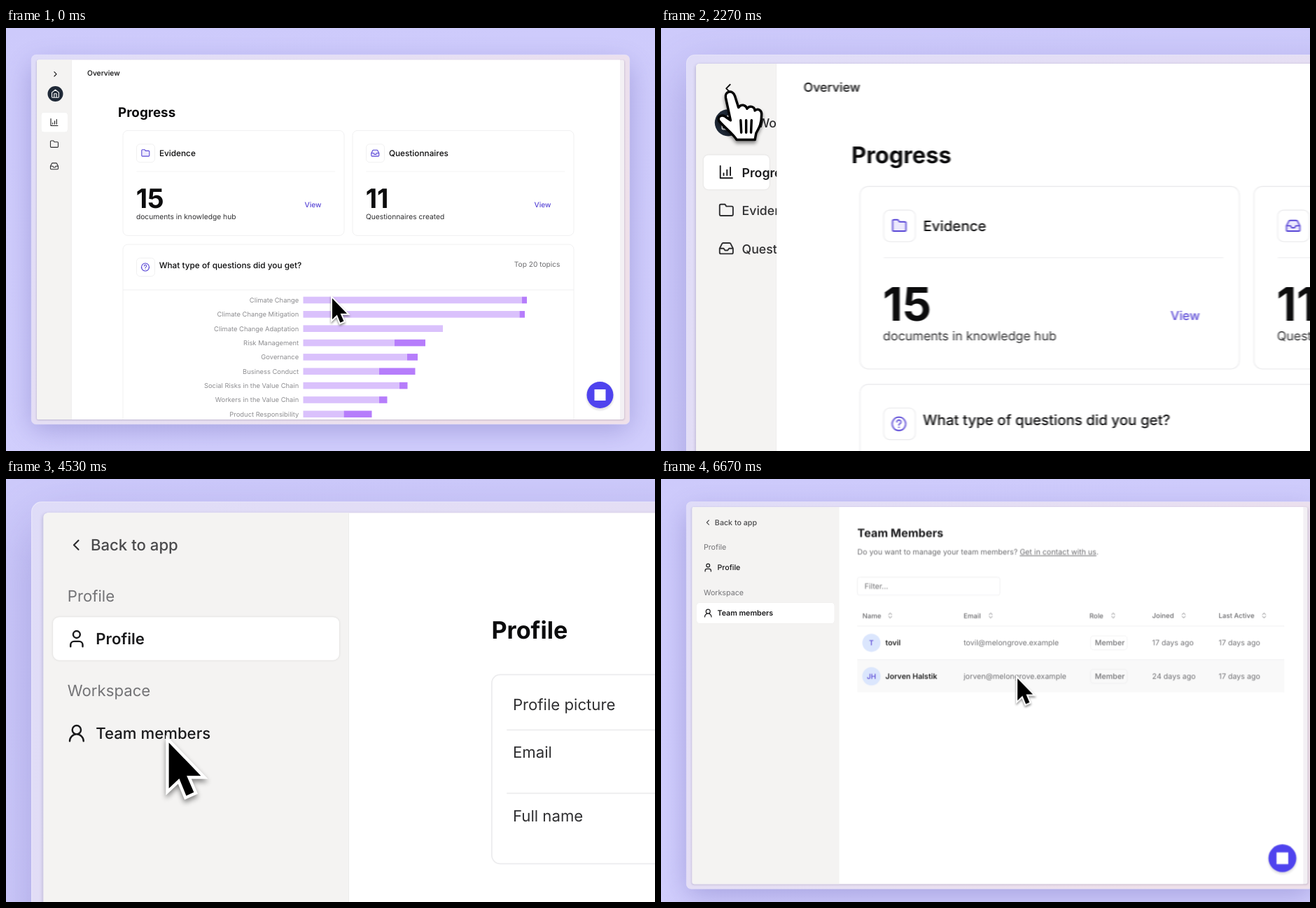
An HTML page that plays this animation: 927 px wide and 604 px high, repeating every 6740 ms.

```html
<!DOCTYPE html>
<html lang="en">
<head>
<meta charset="utf-8">
<title>Workspace tour</title>
<style>
  html, body { margin: 0; width: 100%; height: 100%; overflow: hidden; background: #cfccfc; }
  svg { display: block; width: 927px; height: 604px; font-family: Inter, "Liberation Sans", sans-serif; }
  text { text-rendering: geometricPrecision; white-space: pre; }
  .lift { filter: drop-shadow(0 .7px .7px rgba(0, 0, 0, .13)); }
  .menu { filter: drop-shadow(0 4px 6px rgba(0, 0, 0, .13)) drop-shadow(0 0 .6px rgba(0, 0, 0, .25)); }
  .pointer { filter: drop-shadow(.5px 2px 1.6px rgba(0, 0, 0, .45)); }
</style>
</head>
<body>
<svg viewBox="0 0 927 604">
  <defs>
    <linearGradient id="backdrop" x2=".3" y2="1">
      <stop stop-color="#cdcafb"/><stop offset="1" stop-color="#d1cefd"/>
    </linearGradient>
    <linearGradient id="bezel" x2="1" y2=".5">
      <stop stop-color="#dfdcf8"/><stop offset=".6" stop-color="#e7dff2"/><stop offset="1" stop-color="#efe0e9"/>
    </linearGradient>
    <filter id="soft" x="-20%" y="-20%" width="140%" height="150%"><feGaussianBlur stdDeviation="19"/></filter>
    <filter id="edge" x="-5%" y="-5%" width="110%" height="110%"><feGaussianBlur stdDeviation="1.3"/></filter>
    <filter id="smear" filterUnits="userSpaceOnUse" x="36" y="38" width="860" height="530" color-interpolation-filters="sRGB">
      <feGaussianBlur id="smearBlur" stdDeviation="0 0"/>
    </filter>
    <filter id="trail" filterUnits="userSpaceOnUse" x="-40" y="-30" width="110" height="120" color-interpolation-filters="sRGB">
      <feGaussianBlur id="trailBlur" stdDeviation="0 0"/>
    </filter>
    <clipPath id="screenClip"><rect x="44" y="45.5" width="839" height="513.5" rx="3"/></clipPath>
    <clipPath id="sideClip"><rect id="sideClipBox" x="44" y="45" height="515"/></clipPath>
  </defs>
  <rect width="927" height="604" fill="url(#backdrop)"/>
  <g id="camera">
    <rect x="36" y="52" width="855" height="522" rx="10" fill="#4a42a0" opacity=".32" filter="url(#soft)"/>
    <rect x="36.3" y="38.3" width="854.4" height="527.4" rx="6.5" fill="url(#bezel)" stroke="#eae7fa" stroke-width=".5"/>
    <rect x="43.5" y="46" width="840" height="514" rx="3" fill="#58507a" opacity=".28" filter="url(#edge)"/>
    <g clip-path="url(#screenClip)">
      <rect x="44" y="45" width="839" height="515" fill="#f3f0f4"/>
      <rect x="44" y="45" width="833" height="515" fill="#fff"/>
      <g id="main"></g>
      <g id="side" clip-path="url(#sideClip)"></g>
      <g id="overlay"></g>
    </g>
    <g id="cursor">
      <g class="pointer" id="arrow">
        <path d="M2 4V34L8.8 27.6 13.4 38.8 18.4 36.6 13.7 25.8H23Z" fill="#000" stroke="#fff" stroke-width="4" paint-order="stroke"/>
      </g>
      <g class="pointer" id="hand" stroke="#000" stroke-width="2" stroke-linecap="round" stroke-linejoin="round">
        <path d="M-3.500 5.500C-4.500 0 2 -1.500 4 4L7 13.500C9 10.500 13 11 14 14.500 16 11.500 20 12.500 20.500 16 23 14 26 15.500 26 19 26 27 24 30 21.500 34.500L20.500 40H5.500C2 34.500-4.500 30-9 24.500-11 20.500-6 18.500-2.500 22L.500 24Z" fill="#fff"/>
        <path d="M8.800 24 9.300 34M13.300 24V34M17.700 24 17.300 34"/>
      </g>
    </g>
  </g>
</svg>
<script>
const LOOP = 6740, ZOOM = 1.177, RATE = 6.1, FOCUS_Y = 120;
const ACCENT = '#5a48d6', INK = '#0c0c0d', TEXT = '#2f2f31', MUTED = '#737376', LINE = '#ececee';
const $ = id => document.getElementById(id);
const clamp = (v, a = 0, b = 1) => Math.min(b, Math.max(a, v));
const smooth = u => u * u * (3 - 2 * u);
const within = (t, a, b) => t >= a && t < b;

// Critically damped step response that begins at the given time.
const spring = (t, start) => {
  const x = Math.max(0, t - start) / 1000 * RATE;
  return 1 - (1 + x) * Math.exp(-x);
};

const gear = Array.from({ length: 32 }, (_, i) => {
  const r = i % 4 < 2 ? 10.6 : 8, a = (i + .5) * Math.PI / 16;
  return (12 + r * Math.cos(a)).toFixed(1) + ' ' + (12 + r * Math.sin(a)).toFixed(1);
}).join('L');
const ICONS = {
  right: 'M9 6l6 6-6 6',
  left: 'M15 6l-6 6 6 6',
  down: 'M5 9l7 7 7-7',
  sort: 'M7 9l5-5 5 5M7 15l5 5 5-5',
  home: 'M3 9l9-7 9 7v11a2 2 0 0 1-2 2H5a2 2 0 0 1-2-2zM9 22V12h6v10',
  bars: 'M3 3v18h18M8 17v-3M13 17V9M18 17V5',
  folder: 'M4 20h16a2 2 0 0 0 2-2V8a2 2 0 0 0-2-2h-8l-2-3H4a2 2 0 0 0-2 2v13a2 2 0 0 0 2 2z',
  inbox: 'M22 12h-6l-2 3h-4l-2-3H2M5.500 5.100 2 12v6a2 2 0 0 0 2 2h16a2 2 0 0 0 2-2v-6l-3.500-6.900A2 2 0 0 0 16.800 4H7.200a2 2 0 0 0-1.700 1.100z',
  user: 'M12 11a4 4 0 1 0 0-8 4 4 0 0 0 0 8M19 21v-2a4 4 0 0 0-4-4H9a4 4 0 0 0-4 4v2',
  member: 'M12 13a5 5 0 1 0 0-10 5 5 0 0 0 0 10M20 21a8 8 0 0 0-16 0',
  help: 'M12 2a10 10 0 1 0 .010 0M9 9.200a3 3 0 1 1 4.500 2.600Q12 12.700 12 14M12 17v.200',
  gear: `M${gear}ZM12 8.500a3.500 3.500 0 1 0 .010 0`,
  exit: 'M9 3H3v18h6M17 17l5-5-5-5M21 12H9'
};

const text = (str, x, cy, { size = 10.2, weight = 400, fill = TEXT, anchor = 'start' } = {}) =>
  `<text x="${x}" y="${cy + size * .36}" font-size="${size}" font-weight="${weight}" fill="${fill}" text-anchor="${anchor}">${str}</text>`;
const icon = (name, cx, cy, size = 13.2, color = TEXT, fill = 'none') =>
  `<path transform="translate(${cx - size / 2} ${cy - size / 2}) scale(${size / 24})" d="${ICONS[name]}" fill="${fill}" stroke="${color}" stroke-width="2" stroke-linecap="round" stroke-linejoin="round"/>`;
const box = (x1, y1, x2, y2, fill = '#fff', r = 0, extra = '') =>
  `<rect x="${x1}" y="${y1}" width="${x2 - x1}" height="${y2 - y1}" rx="${r}" fill="${fill}" ${extra}/>`;
const card = (x1, y1, x2, y2, r = 7) => box(x1, y1, x2, y2, '#fff', r, `stroke="${LINE}" stroke-width=".8"`);
const rule = (x1, x2, y, color = LINE) => box(x1, y - .4, x2, y + .4, color);
const tab = (right, cy) => box(50.3, cy - 14.2, right, cy + 14, '#fff', 4, 'class="lift"');

// Label, end of the light bar, end of the dark bar.
const TOPICS = [
  ['Climate Change', 737, 744], ['Climate Change Mitigation', 733.5, 741], ['Climate Change Adaptation', 624, 624],
  ['Risk Management', 555, 599], ['Governance', 573, 588], ['Business Conduct', 533, 584.5],
  ['Social Risks in the Value Chain', 562, 573.5], ['Workers in the Value Chain', 533, 544.5],
  ['Product Responsibility', 482.5, 522.5]
];

const chat = `<circle cx="848.5" cy="526" r="20" fill="#000" opacity=".1" filter="url(#edge)"/>
  <circle cx="848.5" cy="524" r="19" fill="#4f43ee"/>` + box(840.5, 516, 856.5, 532);

function summary(x1, x2, name, label, count, note) {
  return card(x1, 146.4, x2, 296.4) + card(x1 + 19.5, 165.8, x1 + 45.5, 191.8, 5) +
    icon(name, x1 + 32.3, 178.7, 13.2, ACCENT, '#ece9fd') +
    text(label, x1 + 51.9, 178.8, { size: 11.8, weight: 500, fill: INK }) +
    rule(x1 + 19.5, x2 - 13, 204.9, '#f1f1f2') +
    text(count, x1 + 18.7, 243, { size: 38, weight: 700, fill: INK }) +
    text(note, x1 + 18.9, 269.4, { size: 10.25 }) +
    text('View', x2 - 56.5, 252.7, { weight: 500, fill: ACCENT });
}

function overview(p, scrollbar) {
  const left = 167 + 109.5 * p, right = 811 + 34 * p, mid = (left + right) / 2;
  const ratio = (right - left) / 644, chartX = v => left + (v - 167) * ratio;
  const rows = TOPICS.map(([label, light, dark], i) => {
    const y = 388.5 + i * 20.35;
    return text(label, chartX(424.5) - 6.3, y, { size: 9.4, fill: '#8d8d90', anchor: 'end' }) +
      box(chartX(424.5), y - 4.8, chartX(light), y + 4.8, '#dac1fc') +
      box(chartX(light), y - 4.8, chartX(dark), y + 4.8, '#b67dfb');
  }).join('');
  return text('Overview', 116 + 150.6 * p, 64.6, { weight: 500, fill: INK, size: 10.3 }) +
    text('Progress', left - 7, 120.4, { size: 18.8, weight: 700, fill: INK }) +
    summary(left, mid - 6, 'folder', 'Evidence', '15', 'documents in knowledge hub') +
    summary(mid + 6, right, 'inbox', 'Questionnaires', '11', 'Questionnaires created') +
    card(left, 309, right, 620) + card(left + 19.5, 328.5, left + 45.5, 354.5, 5) +
    icon('help', left + 32, 341.5, 13.2, ACCENT) +
    text('What type of questions did you get?', left + 51.7, 338.5, { size: 11.8, weight: 500, fill: INK }) +
    text('Top 20 topics', right - 19.5, 337.7, { fill: '#6b6b6e', anchor: 'end' }) +
    rule(left, right, 374) + rows +
    (scrollbar ? box(871, 84, 876, 350, '#ececec', 2) : '') + chat;
}

function profile() {
  return text('Profile', 338, 122.5, { size: 15.7, weight: 700, fill: INK }) +
    card(338.2, 151.5, 784, 275.5, 5.5) +
    text('Profile picture', 352, 171) + rule(348, 774, 187.8) +
    text('Email', 352, 202.5) + rule(348, 774, 229.3) +
    text('Full name', 352, 244) + chat;
}

const MEMBERS = [
  ['T', 'tovil', 'tovil@melongrove.example', '17 days ago', '17 days ago'],
  ['JH', 'Jorven Halstik', 'jorven@melongrove.example', '24 days ago', '17 days ago']
];
const COLUMNS = [['Name', 276, 314], ['Email', 414, 451], ['Role', 585.5, 618], ['Joined', 671, 714], ['Last Active', 761.7, 823.6]];

function team(hovered) {
  const head = COLUMNS.map(([label, x, sortX]) =>
    text(label, x, 193.2, { size: 9.2, weight: 500, fill: '#69696c' }) + icon('sort', sortX, 193.2, 10, '#69696c')).join('');
  const rows = MEMBERS.map(([initials, name, mail, joined, active], i) => {
    const y = 230.4 + i * 45.6, soft = { fill: MUTED };
    return (hovered === i ? box(269, y - 22.6, 851, y + 22, '#f9f9f9') : '') +
      `<circle cx="288.4" cy="${y}" r="12.4" fill="#dbe6fd"/>` +
      text(initials, 288.4, y, { size: 9.6, weight: 500, fill: ACCENT, anchor: 'middle' }) +
      text(name, 307.4, y, { weight: 600, fill: '#222' }) + text(mail, 414, y, soft) +
      box(587, y - 9.5, 637, y + 9.5, 'none', 4, 'stroke="#eeeeef" stroke-width=".7"') +
      text('Member', 593, y, { weight: 500, fill: MUTED }) + text(joined, 671, y, soft) + text(active, 761.7, y, soft);
  }).join('');
  return text('Team Members', 269.3, 81, { size: 15.5, weight: 700, fill: '#1c1c1e' }) +
    text('Do you want to manage your team members? <tspan text-decoration="underline">Get in contact with us</tspan>.', 269.3, 106.6, { fill: '#6b6b6e' }) +
    card(269.3, 141, 463.6, 165.6, 3) + text('Filter...', 279, 153.2, { fill: MUTED }) +
    head + rule(269, 851, 207.5) + rows + rule(269, 851, 253.2) + chat;
}

function appSide(p, menuOpen) {
  const open = p > 0, right = 88 + 150.5 * p;
  const item = (name, label, y, weight = 500, fill = TEXT) =>
    icon(name, 69, y, 13.2, fill) + (open ? text(label, 81.8, y + .4, { weight, fill }) : '');
  return icon(open ? 'left' : 'right', 70.5, 65.8, 12.8, INK) +
    (menuOpen ? box(56.7, 80.3, 165.1, 108.3, '#e7e6e5', 4) : '') +
    '<circle cx="70.5" cy="94" r="11" fill="#1f2937"/>' + icon('home', 70.5, 93.8, 13.2, '#fff') +
    (open ? text('Workspace', 94.4, 94.3, { weight: 500 }) + icon('down', 156, 94, 10, '#555') : '') +
    tab(right, 134.8) + item('bars', 'Progress', 134.5, 600, '#1a1a1c') +
    item('folder', 'Evidence', 166) + item('inbox', 'Questionnaires', 197.3);
}

function settingsSide(teamActive, teamHover) {
  const item = (name, label, y, active) => icon(name, 65.8, y, 13.6, '#1a1a1c') +
    text(label, 78.4, y, { weight: active ? 600 : 500, fill: '#1a1a1c' });
  return icon('left', 65.5, 66.5, 12) + text('Back to app', 75, 66.6, { weight: 500, fill: '#4a4a4c' }) +
    text('Profile', 59.8, 100, { fill: MUTED }) + text('Workspace', 59.8, 162, { fill: MUTED }) +
    (teamHover ? box(50.3, 175.8, 238.1, 203.8, '#e8e7e6', 4) : '') +
    tab(238.1, teamActive ? 190 : 128) +
    item('user', 'Profile', 128, !teamActive) + item('member', 'Team members', 190, teamActive);
}

const menu = '<g class="menu"><path d="M106 116.500l4.300-4 4.300 4z" fill="#fff"/>' + box(57.1, 116.1, 206.4, 235.1, '#fff', 3.5) + '</g>' +
  text('Workspace', 66.8, 131.8, { fill: '#6b6b6e' }) + rule(57.1, 206.4, 147.3) +
  text('jorven@melongrove.example', 66.8, 163.3, { fill: '#6b6b6e' }) + rule(57.1, 206.4, 179) +
  box(60.8, 182.2, 203.2, 207, '#f3f3f3', 2.5) +
  icon('gear', 73.2, 195, 12.6) + text('Settings', 85.6, 195, { fill: '#1c1c1e', weight: 500 }) +
  icon('exit', 73.2, 219.6, 12) + text('Log out', 85.6, 219.4, { fill: '#1c1c1e', weight: 500 });

// Each move: start, end, then a quadratic curve of from, control and to.
const MOVES = [
  [1300, 2160, [464, 382], [104, 351], [72, 68]],
  [2350, 3000, [72, 68], [102, 62], [125, 92]],
  [3150, 3700, [125, 92], [135, 140], [121.4, 186]],
  [4450, 5180, [121.4, 186], [164, 278], [215, 192]],
  [5450, 6600, [215, 192], [285, 290], [485.5, 275]]
];
function cursorAt(t) {
  const [start, end, from, via, to] = MOVES.findLast(m => t >= m[0]) || MOVES[0];
  const u = smooth(clamp((t - start) / (end - start)));
  return [0, 1].map(i => (1 - u) ** 2 * from[i] + 2 * u * (1 - u) * via[i] + u * u * to[i]);
}

const zoomAt = t => 1 + ZOOM * (spring(t, 1923) - spring(t, 5853));
const cache = {};
function fill(id, key, make) {
  if (cache[id] === key) return;
  cache[id] = key;
  $(id).innerHTML = make();
}

function draw(t) {
  const scale = zoomAt(t), focus = FOCUS_Y * spring(t, 4479);
  $('camera').setAttribute('transform', `translate(36 ${38 - (scale - 1) * focus}) scale(${scale}) translate(-36 -38)`);

  const settings = t >= 4250, teamPage = t >= 5270, menuOpen = within(t, 3050, 4250);
  const p = smooth(clamp((t - 2230) / 200)), sideWidth = 50 + 150.5 * p;
  const [x, y] = cursorAt(t), [px, py] = cursorAt(t - 16);
  const row = teamPage && x > 269 ? Math.floor((y - 207.6) / 45.6) : -1;
  const teamHover = within(t, 4700, 5270), scrollbar = t > 700;

  fill('main', [settings, teamPage, p, row, scrollbar].join(), () =>
    teamPage ? team(row) : settings ? profile() : overview(p, scrollbar));
  fill('side', [settings, teamPage, p, menuOpen, teamHover].join(), () =>
    box(44, 45, 44 + sideWidth, 560, '#f4f3f2') + box(43.6 + sideWidth, 45, 44 + sideWidth, 560, '#eae9e8') +
    (settings ? settingsSide(teamPage, teamHover) : appSide(p, menuOpen)));
  fill('overlay', menuOpen, () => menuOpen ? menu : '');
  $('sideClipBox').setAttribute('width', sideWidth);

  const smear = Math.abs(zoomAt(t + 8) - zoomAt(t - 8)) / .016 * .7 / scale;
  $('smearBlur').setAttribute('stdDeviation', `${smear} 0`);
  $('main').setAttribute('filter', smear > .12 ? 'url(#smear)' : 'none');

  const hand = within(t, 2080, 3250) || within(t, 4700, 6250);
  $('hand').style.display = hand ? '' : 'none';
  $('arrow').style.display = hand ? 'none' : '';
  const trail = [x - px, y - py].map(d => Math.min(2.5, Math.abs(d) * .16));
  $('trailBlur').setAttribute('stdDeviation', trail.join(' '));
  $('cursor').setAttribute('filter', Math.max(...trail) > .1 ? 'url(#trail)' : 'none');
  $('cursor').setAttribute('transform', `translate(${x} ${y})`);
}

const began = performance.now();
(function tick() {
  draw((performance.now() - began) % LOOP);
  requestAnimationFrame(tick);
})();
</script>
</body>
</html>
```
